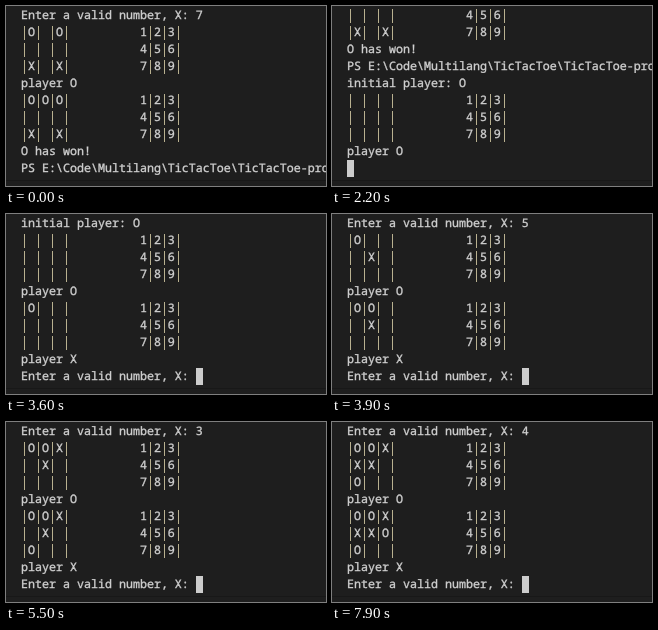
Write an HTML page that moves like this. It is 320 by 180 pixels and loops after 8000 ms.

```html
<!DOCTYPE html>
<html lang="en">
<head>
<meta charset="utf-8">
<title>Tic-tac-toe in a terminal</title>
<style>
  html, body { margin: 0; width: 100%; height: 100%; overflow: hidden; background: #1e1e1e; }
  svg { display: block; width: 100vw; height: 100vh; }
  text {
    font: 11.667px "Noto Sans Mono", "DejaVu Sans Mono", monospace;
    fill: #d0d0d0;
    stroke: #d0d0d0;
    stroke-width: 0.35px;
    white-space: pre;
    text-rendering: geometricPrecision;
  }
  .bar { fill: #b9b190; }
  #cursor { fill: #cccccc; }
</style>
</head>
<body>
<svg viewBox="0 0 320 180">
  <rect width="320" height="180" fill="#1e1e1e"/>
  <g id="screen"></g>
  <rect id="cursor" y="154" width="7" height="17"/>
  <rect y="174" width="320" height="1" fill="#181818"/>
</svg>
<script>
const LOOP = 8000, ROWS = 10, LEFT = 15, CHAR = 7, LINE = 17, BASE = 13;
const NS = "http://www.w3.org/2000/svg";
const PROMPT = "Enter a valid number, X: ";

const cells = s => "|" + [...s].join("|") + "|";
const board = s => [0, 3, 6].map(i =>
  cells(s.slice(i, i + 3)) + " ".repeat(10) + cells("123456789".slice(i, i + 3)).slice(1));

// One round: the answer, the board after X, the board after O.
const round = (key, afterX, afterO) =>
  [PROMPT + key, ...board(afterX), "player O", ...board(afterO)];

const log = [
  ...round("7", "O O   X X", "OOO   X X"),
  "O has won!",
  "PS E:\\Code\\Multilang\\TicTacToe\\TicTacToe-pro",
  "initial player: O", ...board("         "), "player O", ...board("O        "),
  "player X", ...round("5", "O   X    ", "OO  X    "),
  "player X", ...round("3", "OOX X    ", "OOX X O  "),
  "player X", ...round("4", "OOXXX O  ", "OOXXXOO  "),
  "player X", PROMPT
];

// Start time, first visible line, text on the last row (null: full line, no cursor).
const steps = [
  [0, 0, null],
  [2200, 6, ""],
  [2800, 10, PROMPT],
  [3700, 10, PROMPT + "5"],
  [3900, 19, PROMPT],
  [5100, 19, PROMPT + "3"],
  [5500, 28, PROMPT],
  [7600, 28, PROMPT + "4"],
  [7900, 37, PROMPT]
];

const screen = document.getElementById("screen");
const cursor = document.getElementById("cursor");

function add(tag, attrs) {
  const el = document.createElementNS(NS, tag);
  for (const name in attrs) el.setAttribute(name, attrs[name]);
  return screen.appendChild(el);
}

// Bars are drawn as thin rules, taller than the letters.
function write(line, r) {
  const y = LINE * r;
  add("text", { x: LEFT, y: BASE + y }).textContent = line.replaceAll("|", " ");
  [...line].forEach((c, i) => {
    if (c === "|")
      add("rect", { class: "bar", x: LEFT + CHAR * i + 3, y: y + 3, width: 1, height: 14 });
  });
}

function show([, top, last]) {
  screen.replaceChildren();
  for (let r = 0; r < ROWS; r++)
    write(r === ROWS - 1 && last !== null ? last : log[top + r], r);
  cursor.style.display = last === null ? "none" : "";
  cursor.setAttribute("x", LEFT + CHAR * (last || "").length);
}

let current;
function tick() {
  const t = performance.now() % LOOP;
  const step = steps.findLast(s => s[0] <= t);
  if (step !== current) show(current = step);
  requestAnimationFrame(tick);
}
tick();
</script>
</body>
</html>
```
